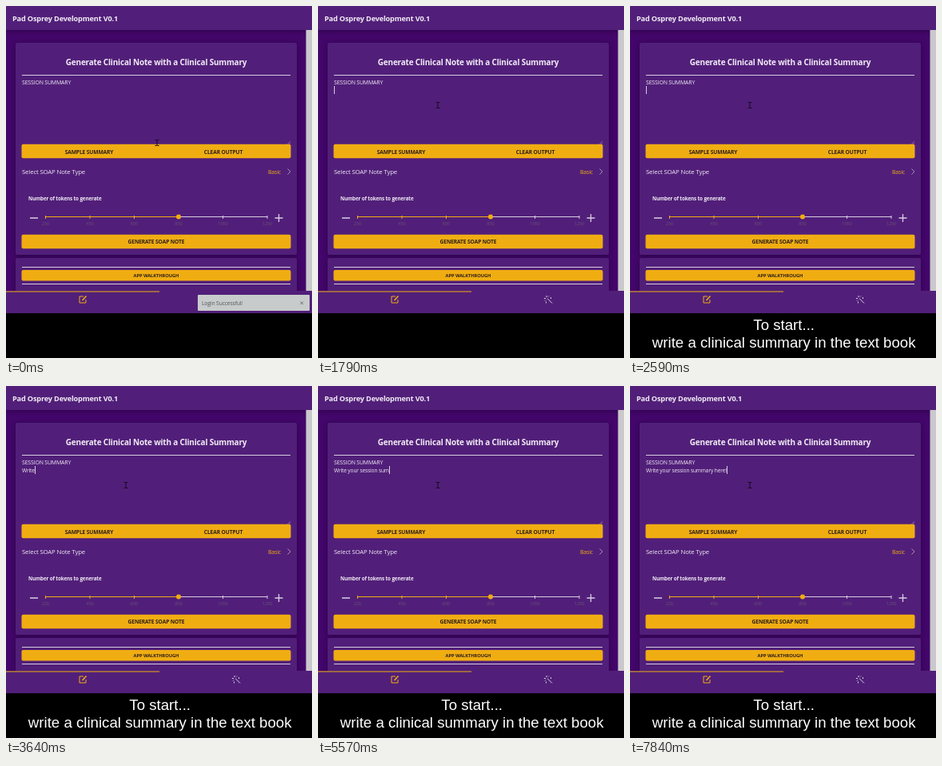
An HTML page that plays this animation: 383x440 px, repeating every 8 s.

```html
<!DOCTYPE html>
<html lang="en">
<head>
<meta charset="utf-8">
<title>Clinical note form</title>
<style>
  html, body { margin: 0; width: 100%; height: 100%; overflow: hidden; background: #000; }
  svg { display: block; width: 383px; height: 440px; }
  text { font-family: "Open Sans", "Noto Sans", sans-serif; letter-spacing: -.02em; fill: #f1eaf5; white-space: pre; }
  .bold { font-weight: 700; }
  .mid { text-anchor: middle; }
  .dark { fill: #30211a; }
  .gold { fill: #f0ad12; }
  .panel { fill: #511f79; }
  .line { stroke: #d9cce2; fill: none; }
  .active { stroke: #f0ad12; }
  .faint { stroke: #a78fb8; }
  .shade { filter: drop-shadow(0 1px 3px #2b0348); }
  #caption text { font: 18.67px "Liberation Sans", Arial, sans-serif; letter-spacing: 0; fill: #fff; }
</style>
</head>
<body>
<svg viewBox="0 0 383 440">
  <rect width="383" height="384" fill="#43066a"/>
  <rect class="panel shade" width="383" height="30"/>
  <text class="bold" x="8" y="19" font-size="9.2">Pad Osprey Development V0.1</text>
  <rect x="375.5" y="30" width="7.5" height="327" fill="#cac8cc"/>

  <g class="shade">
    <rect class="panel" x="12" y="46" width="352" height="265" rx="2"/>
    <rect class="panel" x="12" y="315" width="352" height="50" rx="2"/>
  </g>
  <text class="bold mid" x="188" y="74" font-size="10">Generate Clinical Note with a Clinical Summary</text>
  <path class="line" d="M20 86.5H356"/>
  <text x="20" y="98" font-size="6.9">SESSION SUMMARY</text>
  <text id="typed" x="20" y="108" font-size="6.6"></text>
  <rect id="caret" y="100" width="1" height="10" fill="#d9cce2"/>
  <path class="line faint" stroke-width=".6" d="M352 173l4-4M354 173l2-2"/>

  <g class="gold">
    <rect x="19.5" y="172.7" width="337" height="17.5" rx="2"/>
    <rect x="19.5" y="285.7" width="337" height="17.5" rx="2"/>
    <rect x="19.5" y="330" width="337" height="13.5" rx="2"/>
  </g>
  <g class="bold mid">
    <text class="dark" x="104" y="184.5" font-size="6.7">SAMPLE SUMMARY</text>
    <text class="dark" x="272" y="184.5" font-size="6.7">CLEAR OUTPUT</text>
    <text class="dark" x="188" y="297" font-size="6.7">GENERATE SOAP NOTE</text>
    <text class="dark" x="188" y="339" font-size="5.8">APP WALKTHROUGH</text>
  </g>

  <text x="20" y="210" font-size="7.8">Select SOAP Note Type</text>
  <text class="gold" x="328" y="209.5" font-size="6.9">Basic</text>
  <path class="line faint" d="M352.5 203.5l3.5 3.5-3.5 3.5"/>

  <text class="bold" x="28" y="243" font-size="6.3">Number of tokens to generate</text>
  <path class="line" stroke-width="1.3" d="M30 265H40M336.5 265H346.5M341.5 260V270"/>
  <path class="line" d="M216 263.5H327"/>
  <path class="line active" d="M49 263.5H216"/>
  <g id="ticks"></g>
  <circle class="gold" cx="216" cy="263.5" r="3"/>
  <path class="line" d="M20 326.5H356M20 347.5H356"/>

  <rect class="panel" y="356" width="383" height="28"/>
  <path class="line active" d="M0 357H192"/>
  <path class="line active" d="M97 363H92V371H100V367"/>
  <path class="line active" stroke-width="1.6" d="M95.5 368l5-5.5"/>
  <path class="line" d="M287 365.5l6 6M286 362v2M283 365.5h2M289 362.5l-1 1M284 368.5l1-1M291.5 364v2M285.5 369.5v2"/>

  <g id="toast">
    <rect x="240" y="361" width="140" height="20" rx="1" fill="#c8cbcc"/>
    <text x="245" y="373.5" font-size="6.75" style="fill:#545659">Login Successful!</text>
    <path d="M368.5 369.5l3.5 3.5m0-3.5l-3.5 3.5" stroke="#65676a" stroke-width=".9"/>
  </g>

  <path id="pointer" d="M-2.5 -3.5H-.5L0 -3L.5 -3.5H2.5M0 -3V3M-2.5 3.5H-.5L0 3L.5 3.5H2.5" fill="none" stroke="#170622"/>

  <g id="caption" class="mid">
    <text x="192.7" y="405">To start...</text>
    <text x="192.7" y="427">write a clinical summary in the text book</text>
  </g>
</svg>
<script>
const LOOP = 8000, CLICK = 1490, BLINK = 530;
const MESSAGE = "Write your session summary here!";
const $ = id => document.getElementById(id);

// Bursts of typing: [first key time, number of keys], 80 ms apart.
const keys = [[3320, 5], [3800, 9], [4600, 1], [4850, 1], [5010, 3],
              [5330, 3], [5650, 4], [6050, 5], [6490, 1]]
  .flatMap(([start, count]) => Array.from({ length: count }, (_, i) => start + i * 80));

const progress = (t, from, to) => Math.min(1, Math.max(0, (t - from) / (to - from)));
const ease = p => p * p * (3 - 2 * p);

$("ticks").innerHTML = Array.from({ length: 6 }, (_, i) => {
  const x = 49.5 + i * 55.5;
  return `<path class="line ${i < 3 ? "active" : ""}" d="M${x} 262V266"/>
    <text class="mid" x="${x}" y="273.5" font-size="5.6" style="fill:#6b5078">${250 + i * 200}</text>`;
}).join("");

function draw(t) {
  const count = keys.filter(k => k <= t).length;
  const typed = $("typed");
  typed.textContent = MESSAGE.slice(0, count);
  const width = count ? typed.getComputedTextLength() : 0;
  $("caret").setAttribute("x", Math.round(20 + width));
  const sinceKey = t - (count ? keys[count - 1] : CLICK);
  $("caret").style.opacity = sinceKey >= 0 && sinceKey % (2 * BLINK) < BLINK ? 1 : 0;

  const move = ease(progress(t, 1150, 1480));
  $("pointer").setAttribute("transform", `translate(${189 - 39 * move} ${171 - 47 * move})`);
  $("toast").style.opacity = 1 - progress(t, 1400, 1720);
  $("caption").style.opacity = progress(t, 1870, 2350);
}

const begin = performance.now();
function frame() {
  draw((performance.now() - begin) % LOOP);
  requestAnimationFrame(frame);
}
frame();
</script>
</body>
</html>
```
